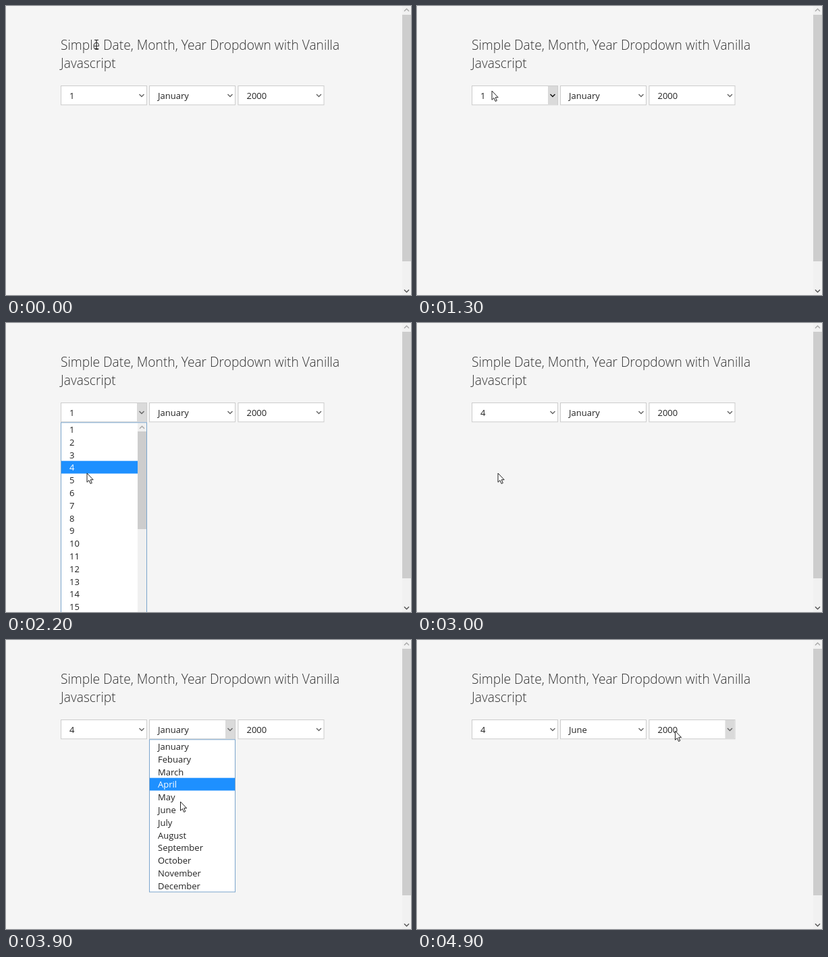
These frames come from a looping animation (600 by 429 pixels, 5000 ms). An HTML page:

```html
<!DOCTYPE html>
<html lang="en">
<head>
<meta charset="utf-8">
<title>Date dropdown</title>
<style>
  html, body { margin: 0; width: 100%; height: 100%; overflow: hidden; background: #f5f5f5; }
  svg { display: block; width: 100%; height: 100%; }
  text { font: 13px "Open Sans", "Noto Sans", sans-serif; fill: #222; }
  .title { font-size: 19.2px; font-weight: 300; fill: #333; }
  .on { fill: #fff; }
</style>
</head>
<body>
<svg id="stage" viewBox="0 0 600 429"></svg>
<script>
const LOOP = 5000, ROW = 18.8, TOP = 148.3;
const LEFT = [81, 212, 343.5];
const days = Array.from({ length: 15 }, (_, i) => i + 1);
const months = ['January', 'Febuary', 'March', 'April', 'May', 'June', 'July',
  'August', 'September', 'October', 'November', 'December'];

// Each step starts at t; x, y is the pointer; hot is the select with a lit button;
// open is the select with its list shown and pick is the lit row.
const steps = [
  { t: 0, x: 134, y: 57, beam: true },
  { t: 1000, x: 128, y: 80, beam: true },
  { t: 1100, x: 112, y: 125, hot: 0 },
  { t: 1300, x: 110.5, y: 125.5, hot: 0 },
  { t: 1500, x: 110.5, y: 125.5, hot: 0, open: 0, pick: 0 },
  { t: 2000, x: 114, y: 167, hot: 0, soft: true, open: 0, pick: 0 },
  { t: 2200, x: 119.5, y: 222.5, hot: 0, soft: true, open: 0, pick: 3 },
  { t: 3000, x: 119.5, y: 222.5, day: 4 },
  { t: 3100, x: 132, y: 193, day: 4 },
  { t: 3300, x: 190, y: 172, day: 4 },
  { t: 3400, x: 236, y: 150, day: 4 },
  { t: 3600, x: 246, y: 129.5, day: 4, hot: 1 },
  { t: 3700, x: 246, y: 131, day: 4, hot: 1, open: 1, pick: 0 },
  { t: 3800, x: 250, y: 175, day: 4, hot: 1, soft: true, open: 1, pick: 0 },
  { t: 3900, x: 258, y: 239.5, day: 4, hot: 1, soft: true, open: 1, pick: 3 },
  { t: 4100, x: 262, y: 254, day: 4, hot: 1, soft: true, open: 1, pick: 5 },
  { t: 4400, x: 262, y: 254, day: 4, month: 'June' },
  { t: 4500, x: 310, y: 190, day: 4, month: 'June' },
  { t: 4600, x: 378, y: 138.5, day: 4, month: 'June', hot: 2, soft: true },
  { t: 4900, x: 382, y: 134.5, day: 4, month: 'June', hot: 2, soft: true }
];

const rect = (x, y, w, h, fill, more = '') =>
  `<rect x="${x}" y="${y}" width="${w}" height="${h}" fill="${fill}" ${more}/>`;
const text = (x, y, s, cls = '') => `<text x="${x}" y="${y}" class="${cls}">${s}</text>`;
const chevron = (x, y, dy, color) =>
  `<path d="M${x - 3.5} ${y - dy}L${x} ${y + dy}L${x + 3.5} ${y - dy}" fill="none" stroke="${color}" stroke-width="1.4"/>`;

function select(i, value, s) {
  const x = LEFT[i], hot = s.hot === i;
  return rect(x + .5, 118.5, 127, 28.3, '#fff', 'stroke="#ccc"') +
    (hot ? rect(x + 113, 119, 14, 27.3, '#dadada') : '') +
    chevron(x + 120, 132.7, 1.8, hot && !s.soft ? '#111' : '#666') +
    text(x + 13, 138, value);
}

function list(i, pick) {
  const items = i ? months : days, x = LEFT[i], h = items.length * ROW;
  const bar = i ? 0 : 13.5;
  let out = rect(x + .5, 147.8, 127, h + .6, '#fff');
  items.forEach((name, n) => {
    const y = TOP + n * ROW;
    if (n === pick) out += rect(x + 1, y, 126.5 - bar, ROW, '#1e90ff');
    out += text(x + 13, y + 14.6, name, n === pick ? 'on' : '');
  });
  if (bar) out += rect(x + 114, TOP, bar, 300, '#f0f0f0') +
    rect(x + 114, 161, bar, 145, '#cdcdcd') + chevron(x + 120.5, 155, -1.8, '#aaa');
  return out + rect(x + .5, 147.8, 127, h + .6, 'none', 'stroke="#7ba5cc"');
}

function pointer({ x, y, beam }) {
  const shape = beam
    ? '<path d="M-3-6.5H3M0-6.5V6.5M-3 6.5H3" fill="none" stroke="#222" stroke-width="1.2"/>'
    : '<path d="M.5.5V13.8L3.5 11L5.6 16L7.8 15L5.7 10.2H9.7Z" fill="#fff" stroke="#222"/>';
  return `<g transform="translate(${x} ${y})">${shape}</g>`;
}

const page = rect(0, 0, 600, 429, '#f5f5f5') +
  text(81, 65, 'Simple Date, Month, Year Dropdown with Vanilla', 'title') +
  text(81, 92, 'Javascript', 'title') +
  rect(587, 0, 13, 429, '#f1f1f1') + rect(587, 13, 13, 366, '#cdcdcd') +
  chevron(593.5, 6, -1.8, '#aaa') + chevron(593.5, 423, 1.8, '#555');

const stage = document.getElementById('stage');
let shown;

function frame(now) {
  const s = steps.findLast(step => step.t <= now % LOOP);
  if (s !== shown) {
    shown = s;
    stage.innerHTML = page +
      [s.day || 1, s.month || 'January', 2000].map((v, i) => select(i, v, s)).join('') +
      (s.open >= 0 ? list(s.open, s.pick) : '') + pointer(s);
  }
  requestAnimationFrame(frame);
}
frame(0);
</script>
</body>
</html>
```
